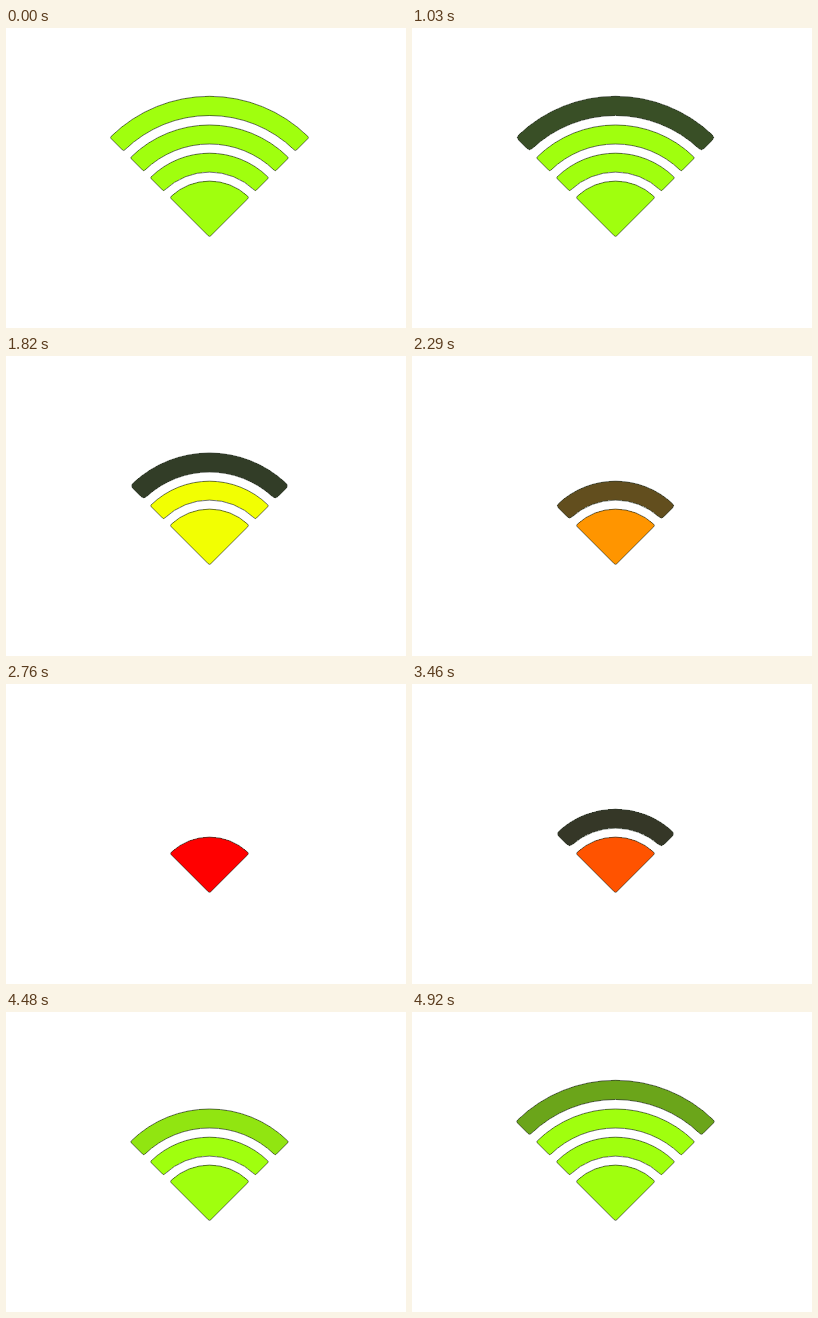
Write an HTML page that moves like this. It is 400 px wide and 300 px high and loops after 5000 ms.

```html
<!DOCTYPE html>
<html lang="en">
<head>
<meta charset="utf-8">
<title>Signal strength</title>
<style>
  html, body { margin: 0; width: 100%; height: 100%; overflow: hidden; background: #fff; }
  svg { display: block; width: 100vw; height: 100vh; }
  path { stroke: #30382c; stroke-width: .7; stroke-linejoin: round; shape-rendering: crispEdges; }
</style>
</head>
<body>
<svg id="stage" viewBox="0 0 400 300"></svg>
<script>
const LOOP = 5000;
const CENTER = { x: 203.5, y: 209 };
const GREEN = [160, 255, 14], YELLOW = [255, 255, 0], RED = [255, 0, 0], DARK = [42, 53, 41];

// Bands from the outermost inwards: [outer radius, inner radius]
const BANDS = [[140.7, 121.5], [112, 93], [83.8, 64.9]];
const CORE_RADIUS = 55.9;

const LOSS = { start: 640, length: 680, power: 2.4, cutoff: 0.05 };
const GAIN = { start: 3310, step: 564, length: 650, power: 2, cutoff: 0.13 };

const COLOR_KEYS = [
  [0, GREEN], [1320, GREEN], [1900, YELLOW], [2000, YELLOW], [2700, RED],
  [3250, RED], [3900, YELLOW], [3960, YELLOW], [4450, GREEN], [LOOP, GREEN]
];

const stage = document.getElementById('stage');
const clamp = v => Math.min(1, Math.max(0, v));
const mix = (a, b, p) => a.map((v, i) => v + (b[i] - v) * p);
const rgb = c => `rgb(${c.map(Math.round).join(',')})`;

// Point at a radius and an angle (radians) measured from straight up
function polar(r, angle) {
  const x = CENTER.x + r * Math.sin(angle);
  const y = CENTER.y - r * Math.cos(angle);
  return `${x.toFixed(2)} ${y.toFixed(2)}`;
}

// Quarter ring with rounded corners
function bandPath([outer, inner], round) {
  const a = Math.PI / 4;
  const ao = a - round / outer, ai = a - round / inner;
  return `M${polar(outer, -ao)} A${outer} ${outer} 0 0 1 ${polar(outer, ao)}
    Q${polar(outer, a)} ${polar(outer - round, a)} L${polar(inner + round, a)}
    Q${polar(inner, a)} ${polar(inner, ai)} A${inner} ${inner} 0 0 0 ${polar(inner, -ai)}
    Q${polar(inner, -a)} ${polar(inner + round, -a)} L${polar(outer - round, -a)}
    Q${polar(outer, -a)} ${polar(outer, -ao)}Z`;
}

function corePath(r, round = 1.8) {
  const a = Math.PI / 4, ar = a - round / r;
  return `M${polar(r, -ar)} A${r} ${r} 0 0 1 ${polar(r, ar)}
    Q${polar(r, a)} ${polar(r - round, a)} L${polar(round, a)}
    Q${polar(0, 0)} ${polar(round, -a)} L${polar(r - round, -a)}
    Q${polar(r, -a)} ${polar(r, -ar)}Z`;
}

function addPath() {
  const path = document.createElementNS('http://www.w3.org/2000/svg', 'path');
  return stage.appendChild(path);
}

const bands = BANDS.map(addPath);
const core = addPath();
core.setAttribute('d', corePath(CORE_RADIUS));

function signalColor(t) {
  const i = COLOR_KEYS.findIndex(([time]) => time > t);
  const [t0, c0] = COLOR_KEYS[i - 1], [t1, c1] = COLOR_KEYS[i];
  return mix(c0, c1, (t - t0) / (t1 - t0));
}

// Brightness of a band, or null while it is switched off
function bandLevel(index, t) {
  const losing = t < 3000;
  const phase = losing ? LOSS : GAIN;
  const begin = losing
    ? phase.start + index * phase.length
    : phase.start + (BANDS.length - 1 - index) * phase.step;
  const progress = clamp((t - begin) / phase.length);
  const level = losing ? 1 - progress : progress;
  return level < phase.cutoff ? null : level ** phase.power;
}

function draw(t) {
  const color = signalColor(t);
  core.setAttribute('fill', rgb(color));
  bands.forEach((band, i) => {
    const level = bandLevel(i, t);
    band.setAttribute('visibility', level === null ? 'hidden' : 'visible');
    if (level === null) return;
    // Corners soften as the band darkens
    band.setAttribute('d', bandPath(BANDS[i], 1.6 + 3 * (1 - level) ** 2));
    band.setAttribute('fill', rgb(mix(DARK, color, level)));
  });
}

const startTime = performance.now();
function tick() {
  draw((performance.now() - startTime) % LOOP);
  requestAnimationFrame(tick);
}
draw(0);
requestAnimationFrame(tick);
</script>
</body>
</html>
```
